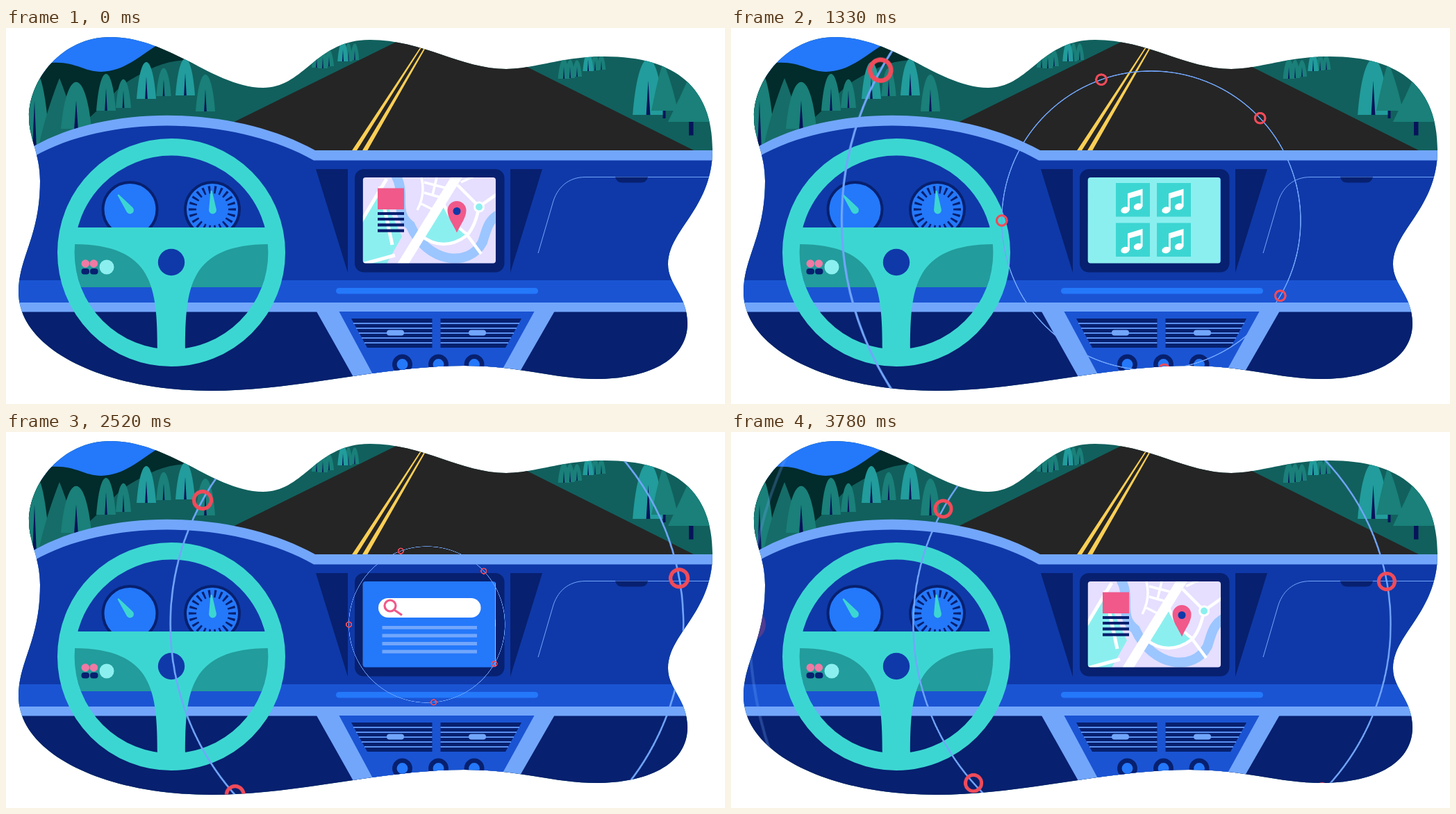
These frames come from a looping animation (1035x541 px, 3850 ms). An HTML page without scripts:

```html
<!DOCTYPE html>
<html lang="en">
<head>
<meta charset="utf-8">
<title>Dashboard</title>
<style>
  html, body { margin: 0; width: 100%; height: 100%; overflow: hidden; background: #fff; }
  svg { display: block; width: 100%; height: 100%; }
  :root {
    --blue: #2478fa; --trim: #72a6fb; --dash: #0f39a8; --band: #1a54d3; --navy: #07206f;
    --aqua: #3cd6d2; --ice: #8cefef; --teal: #229c9c; --fir: #1a8079; --hill: #11605d;
    --pink: #f0598a;
  }
  .blue { fill: var(--blue) } .trim { fill: var(--trim) } .dash { fill: var(--dash) }
  .band { fill: var(--band) } .navy { fill: var(--navy) } .aqua { fill: var(--aqua) }
  .ice { fill: var(--ice) } .teal { fill: var(--teal) } .fir { fill: var(--fir) }
  .hill { fill: var(--hill) } .pink { fill: var(--pink) } .white { fill: #fff }
  .line { fill: none; stroke: #fff }

  /* one picture step = 70 ms, 55 steps per loop */
  .strip { animation: slide 3850ms -10ms step-end infinite; }
  .ring { opacity: 0; animation: grow 3850ms infinite, fade 3850ms infinite; animation-delay: var(--d); }
  .late { animation: late 3850ms -10ms step-end infinite; }
  #hoop { fill: none; stroke: var(--trim); stroke-width: .7; }
  #dot { fill: none; stroke: #f04b5a; stroke-width: 1.45; }

  @keyframes grow {
    0% { transform: scale(.613); animation-timing-function: steps(22); }
    40%, 100% { transform: scale(6.3); }
  }
  @keyframes fade {
    0%, 27.273% { opacity: 1; animation-timing-function: steps(7); }
    40%, 100% { opacity: 0; }
  }
  @keyframes late { 0% { opacity: 0 } 78.182%, 100% { opacity: 1 } }
  @keyframes slide {
    0% { transform: none }
    7.273% { transform: translateX(-8px) }
    9.091% { transform: translateX(-32px) }
    10.909% { transform: translateX(-67px) }
    12.727% { transform: translateX(-124px) }
    14.545% { transform: translateX(-159px) }
    16.364% { transform: translateX(-183px) }
    18.182% { transform: translateX(-191px) }
    38.182% { transform: translateX(-199px) }
    40% { transform: translateX(-223px) }
    41.818% { transform: translateX(-257px) }
    43.636% { transform: translateX(-315px) }
    45.455% { transform: translateX(-350px) }
    47.273% { transform: translateX(-374px) }
    49.091% { transform: translateX(-382px) }
    72.727% { transform: translateX(-390px) }
    74.545% { transform: translateX(-414px) }
    76.364% { transform: translateX(-449px) }
    78.182% { transform: translateX(-506px) }
    80% { transform: translateX(-541px) }
    81.818% { transform: translateX(-565px) }
    83.636%, 100% { transform: translateX(-573px) }
  }
</style>
</head>
<body>
<svg viewBox="0 0 1035 541" preserveAspectRatio="none">
<defs>
  <clipPath id="blob"><path d="M33 128C33 75 80 13 150 13C235 13 300 86 370 86C430 86 445 17 524 17C600 17 655 59 720 59C760 59 800 41 862 41C965 41 1017 87 1017 175C1017 260 953 290 953 340C953 370 981 385 981 425C981 480 920 505 850 505C790 505 740 486 660 486C540 486 420 522 295 522C140 522 18 462 18 380C18 330 49 300 49 220C49 180 33 160 33 128Z"/></clipPath>
  <clipPath id="glass"><rect x="513.700" y="215" width="191.300" height="123.400" rx="4"/></clipPath>
  <clipPath id="page"><rect x="513.500" y="215" width="192" height="124"/></clipPath>

  <!-- tree, 28 x 53, standing on the origin -->
  <g id="tree">
    <path d="M-14 0C-12-28-7-53 0-53S12-28 14 0Z"/>
    <path d="M-1.8 0L0-32L1.8 0Z" fill="#06145a"/>
  </g>
  <circle id="hoop" r="99.400"/>
  <circle id="dot" cx="99.400" r="3.35"/>
  <g id="ringA" transform="translate(-.3)">
    <use href="#hoop"/>
    <use href="#dot" transform="rotate(-83.8)"/><use href="#dot" transform="rotate(209)"/>
    <use href="#dot" transform="rotate(-10.4)"/><use href="#dot" transform="rotate(138.4)"/>
    <use href="#dot" transform="rotate(44.6)"/>
  </g>
  <g id="ringB" transform="translate(-1)">
    <use href="#hoop"/>
    <use href="#dot" transform="rotate(-109.5)"/><use href="#dot" transform="rotate(-43.2)"/>
    <use href="#dot" transform="rotate(180)"/><use href="#dot" transform="rotate(30.2)"/>
    <use href="#dot" transform="rotate(85)"/>
  </g>
  <path id="needle" class="aqua" d="M-1-28H1L5.3-1A5.4 5.4 0 1 1-5.3-1Z"/>
  <g id="tile">
    <rect class="aqua" width="49" height="48.5"/>
    <g class="white">
      <ellipse cx="13.5" cy="39" rx="6.3" ry="4.6" transform="rotate(-15 13.5 39)"/>
      <ellipse cx="32" cy="34" rx="6.3" ry="4.6" transform="rotate(-15 32 34)"/>
      <path d="M17 15L38.500 8.500V34H35.700V17.500L19.800 22V39H17Z"/>
    </g>
  </g>

  <g id="map" clip-path="url(#page)">
    <rect x="513" y="215" width="193" height="124" fill="#e6dfff"/>
    <path class="ice" d="M513 276L541 230L552 262L570 300L548 339H513Z"/>
    <path d="M560 210C578 240 556 264 582 284C606 338 666 346 686 308C692 290 694 276 710 268" fill="none" stroke="#9cc6ff" stroke-width="14"/>
    <path class="ice" d="M600 297L630 253Q648 288 662 297Q630 322 600 297Z"/>
    <g class="line">
      <path d="M508 284L548 217M512 340L560 327M538 228L556 312" stroke-width="5"/>
      <path d="M596 298Q630 324 664 298Q676 284 681 257L708 238M681 257L650 226M630 253Q642 282 664 297M664 298L684 325" stroke-width="4.500"/>
      <path d="M598 215Q604 240 592 262M602 222L640 232M602 237L630 245M598 253L616 262M620 215L614 240M655 222L676 212" stroke-width="3.500"/>
      <path d="M566 348L654 206" stroke-width="14"/>
    </g>
    <circle cx="681" cy="257.500" r="8" class="white"/><circle cx="681" cy="257.500" r="5" class="ice"/>
    <rect class="pink" x="535" y="230.500" width="38" height="30.500"/>
    <path d="M535 267H573M535 275H573M535 283.300H573M535 291.600H573" stroke="#07206f" stroke-width="4.200"/>
    <path class="pink" d="M649 294.500C644 283 635.500 273 635.500 262.500A13.500 13.500 0 0 1 662.500 262.500C662.500 273 654 283 649 294.500Z"/>
    <circle class="dash" cx="649" cy="263.500" r="5.500"/>
  </g>
</defs>

<g clip-path="url(#blob)">
  <!-- outside -->
  <rect width="1035" height="541" class="hill"/>
  <path d="M0 0H217V70H0Z" class="blue"/>
  <path d="M20 50H66C100 48 112 63 137 63C170 62 190 42 217 25L270 30V150H20Z" fill="#022b2b"/>
  <path class="hill" d="M60 170C130 135 148 92 180 74C210 56 235 44 275 46V170Z"/>
  <g class="fir">
    <use href="#tree" transform="translate(41 170) scale(1.55 2.05)"/>
    <path d="M77 72C88 100 98 130 106 166H48C56 130 66 100 77 72Z" fill="#166c68"/>
    <use href="#tree" transform="translate(101 145) scale(1.57 1.27)"/>
    <use href="#tree" transform="translate(144 119)"/>
    <use href="#tree" transform="translate(169 115) scale(.78)"/>
    <use href="#tree" transform="translate(227 98) scale(.76)"/>
    <use href="#tree" transform="translate(287 120)"/>
    <use href="#tree" transform="translate(447 57) scale(.5 .45)"/>
    <use href="#tree" transform="translate(456 58) scale(.5 .52)"/>
    <use href="#tree" transform="translate(465 55) scale(.5 .45)"/>
    <use href="#tree" transform="translate(493 48) scale(.4 .5)"/>
    <use href="#tree" transform="translate(502 46) scale(.45)"/>
    <use href="#tree" transform="translate(803 73) scale(.6 .54)"/>
    <use href="#tree" transform="translate(812 72) scale(.5)"/>
    <use href="#tree" transform="translate(822 70) scale(.5 .45)"/>
    <use href="#tree" transform="translate(848 61) scale(.45)"/>
    <use href="#tree" transform="translate(857 60) scale(.45 .4)"/>
  </g>
  <g class="teal">
    <use href="#tree" transform="translate(202 102)"/>
    <use href="#tree" transform="translate(258 97)"/>
    <use href="#tree" transform="translate(485 48) scale(.55)"/>
    <use href="#tree" transform="translate(838 62) scale(.55 .52)"/>
    <use href="#tree" transform="translate(924.500 125) scale(1.6 1.52)"/>
  </g>
  <path d="M945.500 118H949.500V130H945.500ZM983 134H989.500V154.500H983Z" fill="#06145a"/>
  <path class="fir" d="M946 49C955 70 962 95 967 119H929C934 95 939 70 946 49ZM986 64C997 88 1009 112 1020 135H953C964 112 976 88 986 64Z"/>
  <path d="M590 6L290 154L450 195H1028L650 6Z" fill="#252525"/>
  <path d="M497.500 177H504.500L599.300 26H597.500ZM512.500 177H519.800L605.500 26H603.500Z" fill="#fccf55"/>

  <!-- dashboard -->
  <path class="trim" d="M0 195L40 170C150 108 330 112 445 176H1035V250H0Z"/>
  <path class="dash" d="M0 208L40 185C150 123 330 127 443 190.500H1035V364H0Z"/>
  <rect class="band" y="363" width="1035" height="33"/>
  <rect class="navy" y="408" width="1035" height="133"/>
  <rect class="trim" y="395" width="1035" height="13.500"/>
  <rect class="blue" x="475" y="374" width="291" height="8.500" rx="4.250"/>
  <path d="M766 324L787 252C793 230 809 214.500 834 214.500H1020" fill="none" stroke="#72a6fb"/>
  <path class="navy" d="M877 214.500H924Q922 222.500 914 222.500H887Q879 222.500 877 214.500Z"/>
  <path class="navy" d="M446 203H492V352ZM726 203H772L726 352Z"/>
  <rect class="navy" x="502" y="203" width="215.500" height="148.500" rx="13"/>

  <!-- console -->
  <path class="trim" d="M446.500 407H790L713 541H522Z"/>
  <path class="band" d="M479.500 408H760.500L687 541H551Z"/>
  <g id="vent">
    <path class="navy" d="M497 418H613.500V460H520Z"/>
    <path d="M500 425H613.500M504 432H613.500M508 439H613.500M512 446H613.500M516 453H613.500" stroke="#5a90f0" stroke-width="1.800"/>
    <rect class="trim" x="548" y="434.500" width="25" height="8" rx="4"/>
  </g>
  <use href="#vent" transform="matrix(-1 0 0 1 1239 0)"/>
  <g class="blue" stroke="#07206f" stroke-width="6.500">
    <circle cx="570.500" cy="484" r="11.200"/><circle cx="622.500" cy="484" r="11.200"/><circle cx="674" cy="484" r="11.200"/>
  </g>

  <!-- gauges -->
  <g class="blue" stroke="#07206f" stroke-width="4">
    <circle cx="178.500" cy="261" r="39"/><circle cx="297" cy="261" r="39"/>
  </g>
  <circle cx="297" cy="261" r="28.500" pathLength="22" fill="none" stroke="#07206f" stroke-width="11" stroke-dasharray=".36 .64" stroke-dashoffset=".18"/>
  <use href="#needle" transform="translate(178.500 262) rotate(-38)"/>
  <use href="#needle" transform="translate(297.500 262) rotate(-4)"/>

  <!-- wheel -->
  <path class="teal" d="M98 311A140 140 0 0 0 108 373H368A140 140 0 0 0 378 311Z"/>
  <path class="aqua" d="M98 287H378V311C264 312 258 372 258 465H218C218 372 212 312 98 311Z"/>
  <circle cx="238" cy="323" r="151.700" fill="none" stroke="#3cd6d2" stroke-width="24.600"/>
  <circle class="dash" cx="238" cy="337" r="19.200"/>
  <g fill="#ef7aa4"><circle cx="114.300" cy="339" r="5.800"/><circle cx="126.300" cy="339" r="5.800"/></g>
  <rect class="navy" x="108.500" y="346" width="11.500" height="8.500" rx="4"/>
  <rect class="navy" x="121" y="346" width="11.500" height="8.500" rx="4"/>
  <circle class="ice" cx="145" cy="344" r="10.500"/>

  <!-- screen -->
  <g clip-path="url(#glass)">
    <g class="strip">
      <use href="#map"/>
      <g transform="translate(191)">
        <rect class="ice" x="513.500" y="215" width="192" height="124"/>
        <use href="#tile" x="554" y="223"/><use href="#tile" x="613" y="223"/>
        <use href="#tile" x="554" y="280.500"/><use href="#tile" x="613" y="280.500"/>
      </g>
      <g transform="translate(382)">
        <rect class="blue" x="513.500" y="215" width="192" height="124"/>
        <rect class="white" x="536" y="239" width="147.500" height="28" rx="14"/>
        <path d="M559 256L570 263.500" stroke="#f0598a" stroke-width="3.200"/>
        <circle cx="553" cy="250" r="8" fill="none" stroke="#f0598a" stroke-width="3.200"/>
        <path d="M541.500 281.300H678M541.500 293H678M541.500 304.500H678M541.500 316H678" stroke="#72a6fb" stroke-width="4.800"/>
      </g>
      <use href="#map" x="573"/>
    </g>
  </g>

  <!-- expanding rings -->
  <g transform="translate(607 277)">
    <g class="ring" style="--d:-3580ms"><use href="#ringA"/></g>
    <g class="ring" style="--d:-2950ms"><use href="#ringB"/></g>
    <g class="ring" style="--d:-2180ms"><use href="#ringA"/></g>
    <g class="ring" style="--d:-1480ms"><use href="#ringB"/></g>
    <g class="late"><g class="ring" style="--d:-850ms"><use href="#ringA"/></g></g>
  </g>
</g>
</svg>
</body>
</html>
```
